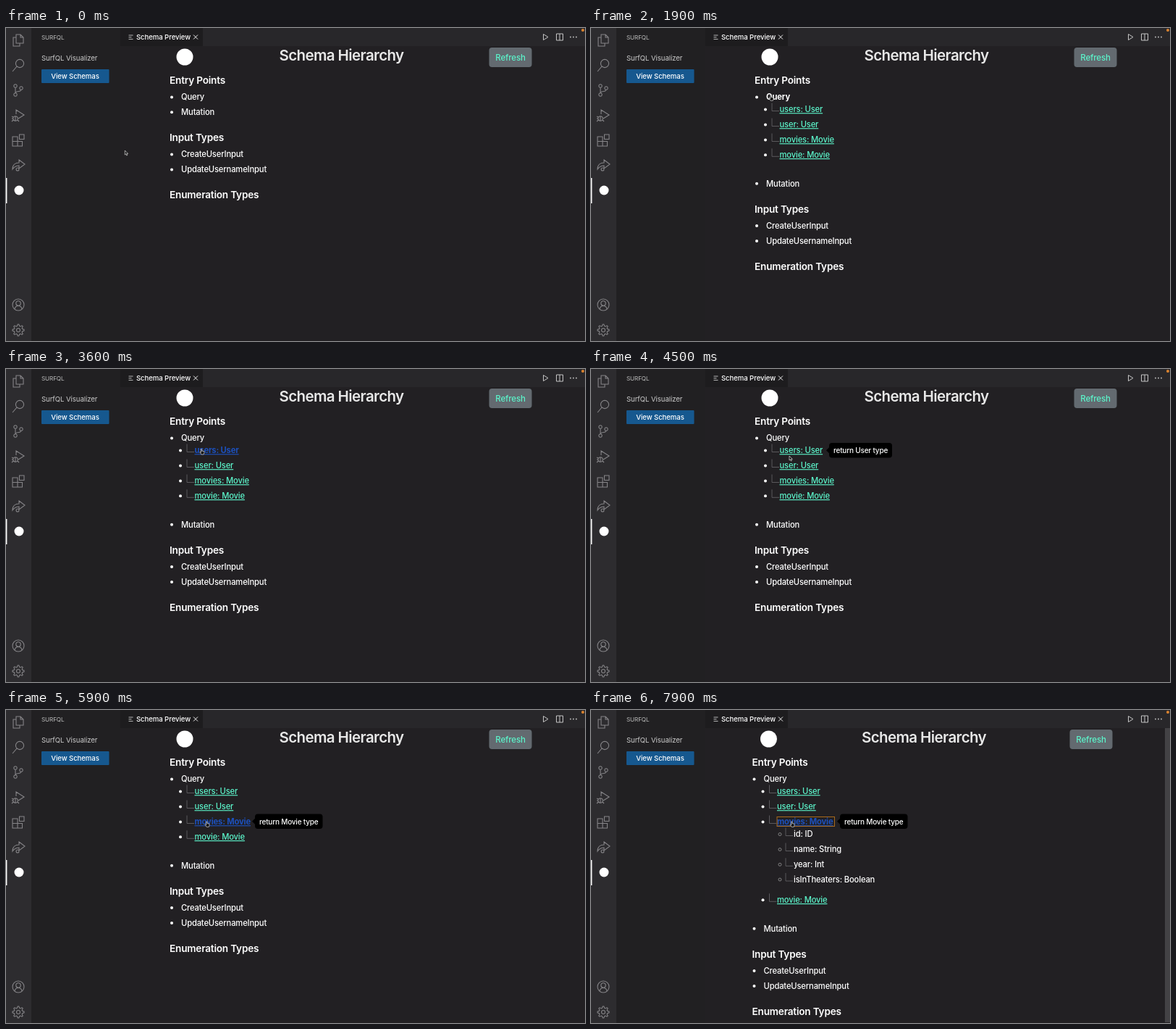
These frames come from a looping animation (800x432 px, 8000 ms). An HTML page:

```html
<!DOCTYPE html>
<html lang="en">
<head>
<meta charset="utf-8">
<title>Schema Preview</title>
<style>
html, body { margin: 0; width: 100%; height: 100%; overflow: hidden; background: #222023; }
svg { display: block; width: 800px; height: 432px; }
text { font: 500 11.2px Inter, "Open Sans", sans-serif; letter-spacing: -.15px; fill: #fff; }
.title { font-size: 20.5px; font-weight: 600; letter-spacing: -.6px; fill: #e8e8e8; }
.h { font-size: 13.6px; font-weight: 600; letter-spacing: -.2px; }
.tip { font-size: 10px; letter-spacing: -.2px; }
.ui { font-size: 9.6px; letter-spacing: -.08px; }
.link { fill: #5cf5cb; text-decoration: underline; }
.bold { font-weight: 700; }
.hot { font-weight: 700; fill: #1c50bd; }
.icon { fill: none; stroke: #858487; stroke-width: 1.1; }
.tree { fill: none; stroke: #69686b; stroke-width: .8; }
</style>
</head>
<body>
<svg id="stage" viewBox="0 0 800 432"></svg>
<script>
const text = (x, y, s, attrs = '') => `<text x="${x}" y="${y}" ${attrs}>${s}</text>`;
const rect = (x, y, w, h, fill, attrs = '') =>
  `<rect x="${x}" y="${y}" width="${w}" height="${h}" fill="${fill}" ${attrs}/>`;
const dot = (x, y, r = 2, fill = '#fff') => `<circle cx="${x}" cy="${y}" r="${r}" fill="${fill}"/>`;
const icon = (x, y, d) => `<path class="icon" transform="translate(${x} ${y})" d="${d}"/>`;
const ring = (x, y, r) => `M${x - r} ${y}a${r} ${r} 0 1 0 ${2 * r} 0a${r} ${r} 0 1 0 ${-2 * r} 0`;
const item = (y, s, attrs) => dot(229, y) + text(242, y + 3.7, s, attrs);
const heading = (y, s) => text(226, y + 5, s, 'class="h"');
const branch = (x, y) => `<path class="tree" d="M${x} ${y - 9}v11h10"/>`;
const link = (y, s, id) => dot(241, y) + branch(250, y) + text(260.5, y + 3.7, s, `id="${id}" class="link"`);
const field = (y, s) => `<circle cx="264.5" cy="${y}" r="2" fill="none" stroke="#999" stroke-width=".8"/>`
  + branch(272.5, y) + text(283.5, y + 3.7, s);
const tip = (id, x, y, w, s) => `<g id="${id}">` + rect(x, y - 10.2, w, 20.4, '#000', 'rx="4"')
  + `<path d="M${x - 4} ${y}l4-4v8z"/>` + text(x + 6, y + 3.7, s, 'class="tip"') + '</g>';

const gear = Array.from({ length: 32 }, (_, i) => {
  const a = (i - .5) * Math.PI / 16, r = i % 4 < 2 ? 8 : 5.8;
  return (i ? 'L' : 'M') + (r * Math.cos(a)).toFixed(1) + ' ' + (r * Math.sin(a)).toFixed(1);
}).join('') + 'Z';

const chrome = rect(0, 0, 35, 432, '#2d2c2f') + rect(35, 0, 123, 432, '#212022')
  + rect(158, 0, 642, 25, '#28272a') + rect(158, 0, 114, 25, '#1d1c1e')
  + rect(0, 207, 1.4, 35, '#fff')
  + icon(17, 17, 'M-3-8h6l4 4v8h-10zM3-8v4h4M-3-4h-4v12h9v-4')
  + icon(17, 51, ring(2, -2, 5.6) + 'M-2 2l-6 7')
  + icon(17, 86, ring(-4, -6, 2.2) + ring(-4, 6, 2.2) + ring(4, -3, 2.2) + 'M-4-4v8M4-1c0 4-8 1-8 5')
  + icon(17, 121, 'M-3-2v-6l11 7-8 5' + ring(-4, 4, 3.2) + 'M-4 1v6M-9 1l2 1M-9 4h2M-9 8l2-2M1 8l-2-2')
  + icon(17, 155, 'M-8-5h7v13h-7zM-8 1.500h13.500v6.500h-13.500M1.500-8h6.500v6.500h-6.500z')
  + icon(17, 189, 'M1-7l8 6-8 6v-4c-5 0-7 2-9 5 0-6 4-9 9-9z' + ring(-1, 6, 2))
  + dot(18, 224, 6.5)
  + icon(17, 382, ring(0, 0, 8) + ring(0, -2, 3.2) + 'M-5 6c1-6 9-6 10 0')
  + icon(17, 417, gear + ring(0, 0, 2.5))
  + text(49, 15.6, 'SURFQL', 'style="font-size:8.2px;font-weight:400;fill:#bbb"')
  + text(49, 44.7, 'SurfQL Visualizer', 'class="ui" style="font-weight:400;fill:#ccc"')
  + rect(49, 57, 93.5, 19, '#16588f', 'rx="1"')
  + text(95.5, 70, 'View Schemas', 'class="ui" text-anchor="middle"')
  + '<path d="M169.500 10h6M169.500 12.700h4M169.500 15.400h6" stroke="#ccc" stroke-width=".9"/>'
  + text(180, 16.2, 'Schema Preview', 'class="ui"')
  + '<path d="M259 9.500l6 6M265 9.500l-6 6" stroke="#eee"/>'
  + '<path d="M742.500 8.500v8l6.500-4zM760.500 8h9v9h-9zM765 8v9" fill="none" stroke="#c5c5c5"/>'
  + [780, 784, 788].map(x => dot(x, 12.5, .9, '#c5c5c5')).join('')
  + dot(797, 3, 2, '#dc8430');

const page = '<g id="logo">' + dot(247, 40, 11.5) + '</g>'
  + '<g id="title">' + text(463.5, 45.3, 'Schema Hierarchy', 'class="title" text-anchor="middle"') + '</g>'
  + '<g id="refresh">' + rect(667.5, 27, 59, 27, '#636a70', 'rx="4"')
  + text(697, 44.8, 'Refresh', 'text-anchor="middle" style="font-size:11.5px;fill:#5cf5cb"') + '</g>'
  + '<g id="list">' + heading(72, 'Entry Points') + item(95.5, 'Query', 'id="query"')
  + '<g id="links">' + link(112.5, 'users: User', 'users') + link(133.5, 'user: User', 'user')
  + link(154.5, 'movies: Movie', 'movies')
  + '<rect id="outline" x="260.500" y="147.500" width="79.500" height="13" fill="none"/>'
  + '<g id="fields">' + field(171.5, 'id: ID') + field(192.5, 'name: String')
  + field(213.3, 'year: Int') + field(234, 'isInTheaters: Boolean') + '</g>'
  + '<g id="last">' + link(175.3, 'movie: Movie', 'movie') + '</g></g>'
  + '<g id="tail">' + item(116.3, 'Mutation') + heading(151.3, 'Input Types')
  + item(174.5, 'CreateUserInput') + item(195.5, 'UpdateUsernameInput')
  + heading(230.3, 'Enumeration Types') + '</g></g>'
  + rect(793, 25, 7, 406, '#434245', 'id="scrollbar"')
  + tip('usersTip', 329, 112.3, 87, 'return User type')
  + tip('userTip', 322.5, 133, 87.5, 'return User type')
  + tip('moviesTip', 344, 153.8, 93.5, 'return Movie type');

const pointer = '<g id="cursor" stroke="#ddd" stroke-width=".7" fill="#111">'
  + '<path id="arrow" d="M0 0v6l1.400-1.200 1 2.200 1-.5-1-2.100h1.900z"/>'
  + '<path id="hand" d="M-.7 0h1.200v2.500l3 .6v2.200l-.7 2h-3.200l-2-3 .5-.6 1.200.8z"/></g>';

document.getElementById('stage').innerHTML = chrome + page + pointer;
const $ = id => document.getElementById(id);
const show = (id, on) => $(id).style.opacity = +on;
const move = (id, x, y) => $(id).setAttribute('transform', `translate(${x} ${y})`);
const clamp = v => Math.max(0, Math.min(1, v));
const between = (t, a, b) => t >= a && t < b;

// time, x, y
const path = [[0, 164.3, 169], [700, 248.5, 93], [3100, 248.5, 93], [3700, 272, 112], [4300, 273.5, 116],
  [4500, 274, 120], [4800, 275, 131], [5100, 276, 137], [5300, 277, 149], [5600, 277.5, 154], [8000, 277.5, 154]];

function cursorAt(t) {
  const i = path.findIndex(p => p[0] > t), a = path[i - 1], b = path[i];
  const k = (t - a[0]) / (b[0] - a[0]), e = k * k * (3 - 2 * k);
  return [a[1] + (b[1] - a[1]) * e, a[2] + (b[2] - a[2]) * e];
}

function draw(t) {
  const open = t >= 1200, deep = t >= 7000;
  const hover = { users: between(t, 3600, 4500), user: between(t, 4700, 5200), movies: t >= 5400 };
  const onQuery = between(t, 600, 3300);
  $('query').setAttribute('class', onQuery ? 'bold' : '');
  for (const id in hover) {
    $(id).setAttribute('class', hover[id] ? 'link hot' : 'link');
  }
  const fade = (a, b) => clamp((t - a) / 300) * clamp(1 - (t - b) / 300);
  show('usersTip', fade(3600, 4500));
  show('userTip', fade(4700, 5200));
  show('moviesTip', fade(5400, 9000));
  show('links', open);
  show('fields', deep);
  show('scrollbar', deep);
  show('outline', t >= 6700);
  $('outline').setAttribute('stroke', deep ? '#a8691c' : '#6a696c');
  move('logo', deep ? -1.5 : 0, 0);
  move('title', deep ? -3.5 : 0, 0);
  move('refresh', deep ? -6 : 0, 0);
  move('list', deep ? -3.5 : 0, 0);
  move('last', 0, deep ? 87 : 0);
  move('tail', 0, deep ? 185.5 : open ? 98.5 : 0);
  const hand = onQuery || t >= 5300 || hover.users || hover.user;
  show('arrow', !hand);
  show('hand', hand);
  move('cursor', ...cursorAt(t));
}

function tick() {
  draw(Math.floor(performance.now() % 8000 / 100) * 100);
  requestAnimationFrame(tick);
}
tick();
</script>
</body>
</html>
```
